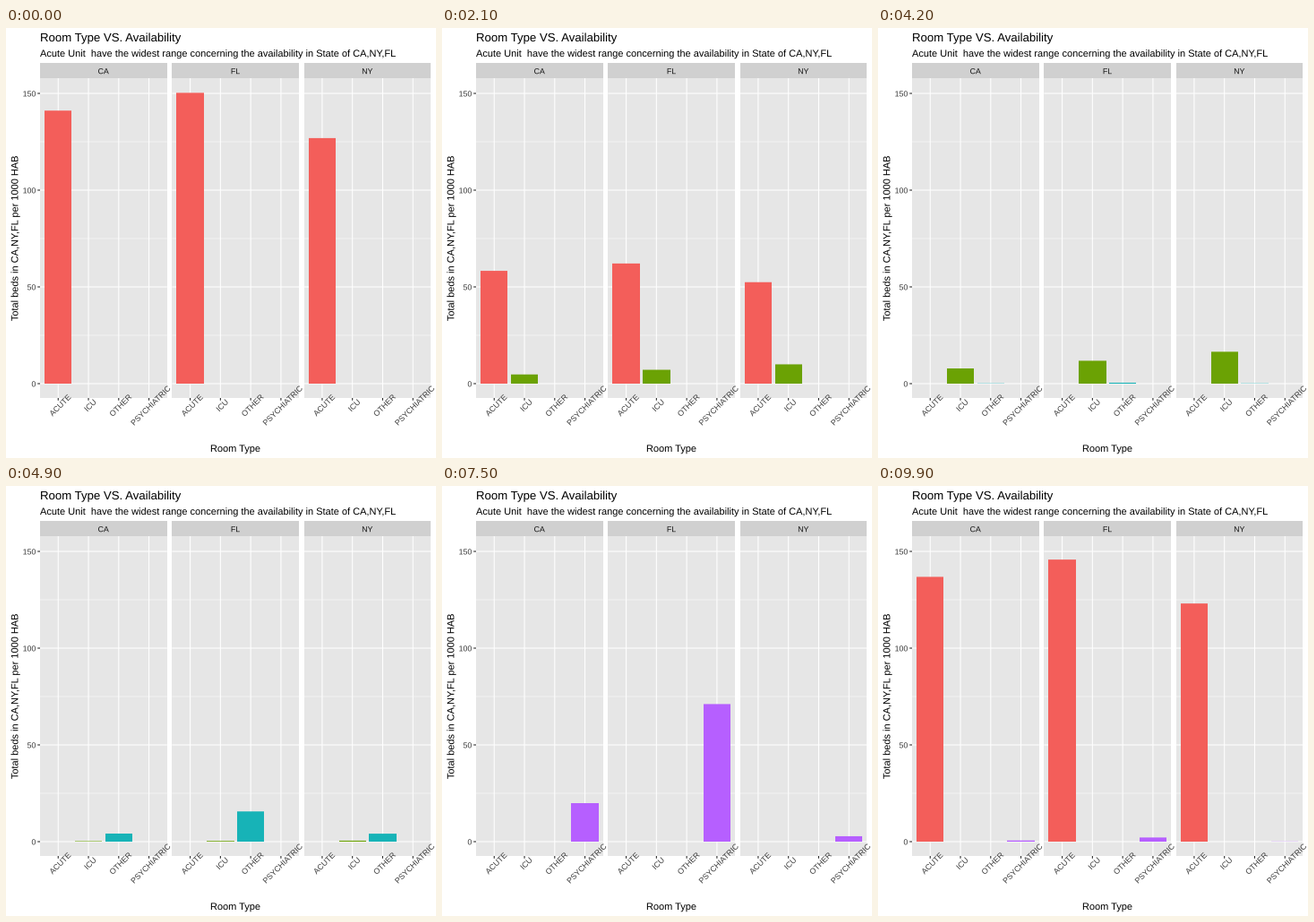
Recreate the animation shown at these times as a matplotlib script. Size 480 by 480 pixels, loop 10000 ms.

```python
import math
import matplotlib.pyplot as plt
from matplotlib.animation import FuncAnimation
from matplotlib.patches import PathPatch, Rectangle
from matplotlib.textpath import TextPath
from matplotlib.transforms import Affine2D

plt.rcParams["font.family"] = "Liberation Sans"

SIZE = 480
FRAMES, INTERVAL = 100, 100
PHASE, MOVE = 25, 9          # frames per room type, frames of transition

STATES = ["CA", "FL", "NY"]
ROOMS = ["ACUTE", "ICU", "OTHER", "PSYCHIATRIC"]
COLORS = ["#F35E5A", "#6BA204", "#17B3B7", "#B65FFF"]
BEDS = [
    [141.1, 150.3, 126.9],
    [8.1, 12.2, 17.0],
    [4.3, 16.1, 4.25],
    [19.9, 71.1, 2.8],
]

LEFT, RIGHT, GAP = 38.0, 474.5, 5.5
STRIP_TOP, TOP, BOTTOM = 39, 56, 413
ZERO, SCALE = 397.0, 2.16
WIDTH = (RIGHT - LEFT - 2 * GAP) / 3
UNIT = WIDTH / 4.2

fig = plt.figure(figsize=(SIZE / 72, SIZE / 72), dpi=72, facecolor="white")
ax = fig.add_axes([0, 0, 1, 1])
ax.set_xlim(0, SIZE)
ax.set_ylim(SIZE, 0)
ax.axis("off")


def rect(x0, y0, x1, y1, color, z):
    patch = Rectangle((x0, y0), x1 - x0, y1 - y0, facecolor=color,
                      linewidth=0, zorder=z, snap=False)
    return ax.add_patch(patch)


def line(x0, y0, x1, y1, color, width, z=2):
    ax.plot([x0, x1], [y0, y1], color=color, lw=width, zorder=z,
            solid_capstyle="butt", snap=False)


def text(x, y, s, size, color="black", align=0.0, angle=0, middle=False):
    """Text on baseline y; align 0 is left, 0.5 centre, 1 right."""
    path = TextPath((0, 0), s, size=size)
    box = path.get_extents()
    dx = -align * (box.x0 + box.x1 if align == 0.5 else box.x1)
    dy = -(box.y0 + box.y1) / 2 if middle else 0
    move = Affine2D().translate(dx, dy).rotate_deg(angle).scale(1, -1).translate(x, y)
    ax.add_patch(PathPatch(path, transform=move + ax.transData, facecolor=color,
                           linewidth=0, zorder=6, snap=False))


def panel_left(i):
    return LEFT + i * (WIDTH + GAP)


def draw_panel(i, name):
    x0 = panel_left(i)
    x1 = x0 + WIDTH
    rect(round(x0), STRIP_TOP, round(x1), TOP, "#D0D0D0", 1)
    rect(round(x0), TOP, round(x1), BOTTOM, "#E6E6E6", 1)
    text((x0 + x1) / 2, 51.2, name, 8.8, "#141414", 0.5)
    for value in range(0, 151, 25):
        y = ZERO - value * SCALE
        line(x0, y, x1, y, "white", 0.53 if value % 50 else 1.07)
    for j, room in enumerate(ROOMS):
        x = x0 + (j + 0.6) * UNIT
        line(x, TOP, x, BOTTOM, "white", 1.07)
        line(x, BOTTOM, x, BOTTOM + 2.75, "#262626", 1.07)
        text(x + 2, 421.2, room, 8.8, "#3C3C3C", 0.5, 45, True)


def make_bar(i, j):
    x = panel_left(i) + (j + 0.6) * UNIT
    half = 0.45 * UNIT
    return rect(round(x - half), ZERO, round(x + half), ZERO, COLORS[j], 4)


for i, name in enumerate(STATES):
    draw_panel(i, name)
for value in (0, 50, 100, 150):
    y = ZERO - value * SCALE
    line(LEFT - 2.75, y, LEFT, y, "#262626", 1.07)
    text(33, y + 3.4, str(value), 8.8, "#3C3C3C", 1)

text(38, 15, "Room Type VS. Availability", 13.2)
text(38, 32, "Acute Unit  have the widest range concerning the availability"
     " in State of CA,NY,FL", 11)
text(256.2, 473, "Room Type", 11, align=0.5)
text(13.4, 235, "Total beds in CA,NY,FL per 1000 HAB", 11, align=0.5, angle=90)

bars = [[make_bar(i, j) for i in range(3)] for j in range(4)]


def update(frame):
    phase, step = divmod(frame, PHASE)
    t = max(0, step - (PHASE - MOVE)) / MOVE
    ease = (1 - math.cos(math.pi * t)) / 2
    share = [0.0] * 4
    share[phase] = 1 - ease
    share[(phase + 1) % 4] = ease
    for j, row in enumerate(bars):
        for bar, beds in zip(row, BEDS[j]):
            bar.set_height(-beds * share[j] * SCALE)
            bar.set_visible(share[j] > 0)
    return [bar for row in bars for bar in row]


anim = FuncAnimation(fig, update, frames=FRAMES, interval=INTERVAL,
                     repeat=True, repeat_delay=0, blit=False)
plt.show()
```
